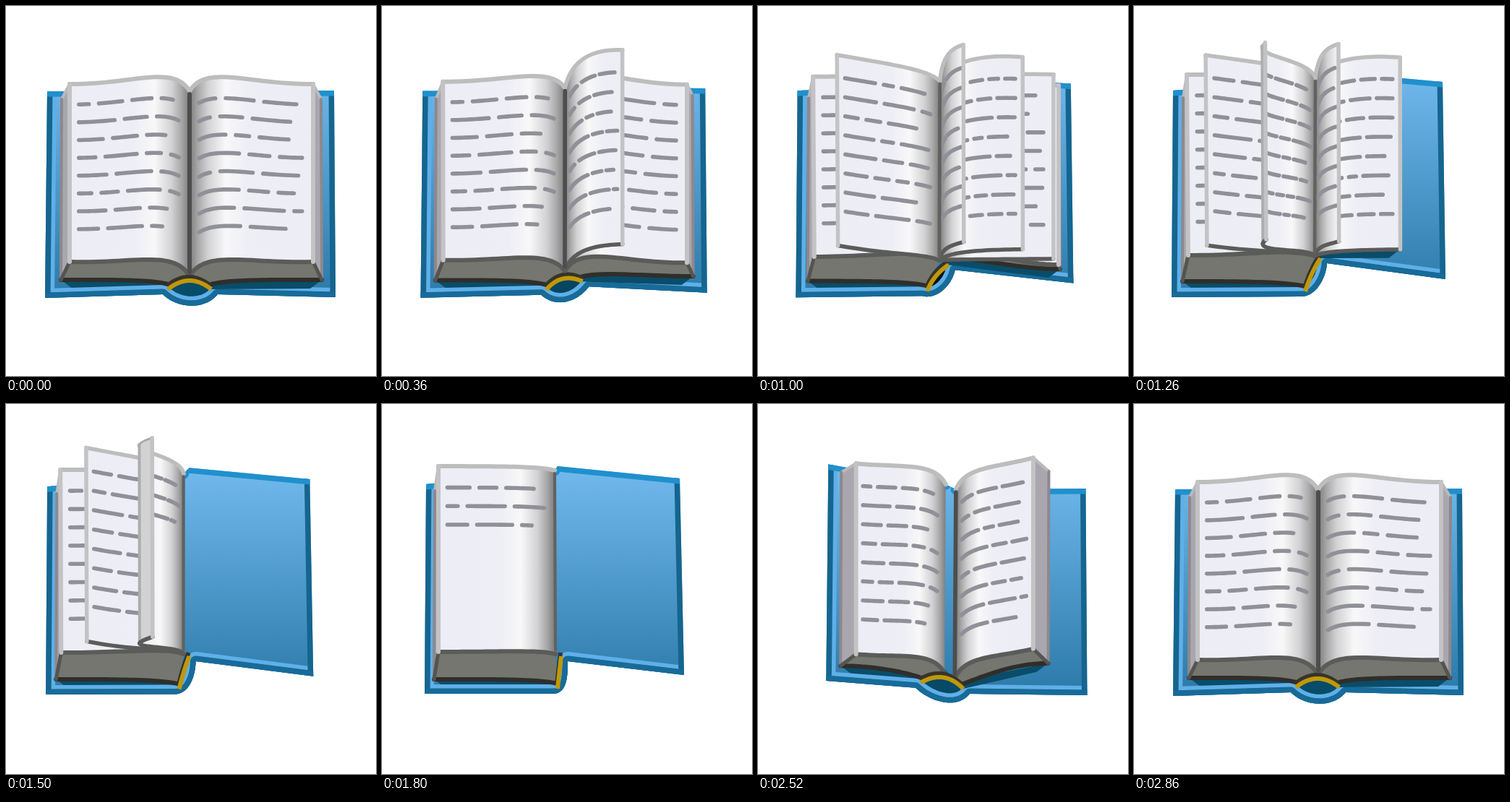
Animation of 512x512 px, one loop 3000 ms. Source, as an HTML page with a canvas:

```html
<!DOCTYPE html>
<html lang="en">
<head>
<meta charset="utf-8">
<title>Book</title>
<style>
html, body { margin: 0; width: 100%; height: 100%; overflow: hidden; background: #fff; }
canvas { display: block; width: 100vw; height: 100vh; }
</style>
</head>
<body>
<canvas id="stage" width="512" height="512"></canvas>
<script>
const ctx = document.getElementById('stage').getContext('2d');
const LOOP = 3000, STEP = 20;
const BEGIN = 60, REST = 1800, END = 2860;

// Key poses: cover corners, spine ends, left page block
const OPEN = {
  lt: [57, 118], lb: [54, 404], rt: [454, 117], rb: [456, 403], hinge: [255, 118],
  j0: [217, 399], j3: [293, 399], top: [254, 118], bottom: [254, 374],
  faceT: [88, 108], faceB: [88, 354], baseB: [76, 379], rise: 38,
};
const FANNED = {
  lt: [54, 117], lb: [52, 403], rt: [427, 105], rb: [431, 378], hinge: [262, 90],
  j0: [230, 402], j3: [267, 356], top: [251, 100], bottom: [250, 346],
  faceT: [73, 95], faceB: [75, 345], baseB: [67, 381], rise: 12,
};
const STACKED = {
  lt: [61, 111], lb: [59, 401], rt: [412, 103], rb: [418, 375], hinge: [243, 86],
  j0: [236, 401], j3: [257, 356], top: [239, 92], bottom: [240, 346],
  faceT: [78, 86], faceB: [78, 343], baseB: [72, 381], rise: 6,
};
const LIFTED = {
  lt: [134, 52], lb: [131, 364], rt: [453, 117], rb: [455, 403], hinge: [291, 118],
  j0: [219, 387], j3: [293, 403], top: [265, 105], bottom: [262, 372],
  faceT: [179, 59], faceB: [179, 339], baseB: [149, 347], rise: 26,
};
const POSES = [[BEGIN, OPEN], [1260, FANNED], [REST, STACKED], [2200, LIFTED], [END, OPEN]];

// Sheets turned one by one
const STARTS = [60, 395, 640, 770, 900, 1035], TURN = 730;

const clamp = x => Math.min(1, Math.max(0, x));
const smooth = x => (1 - Math.cos(Math.PI * x)) / 2;
const shift = (p, dx, dy) => [p[0] + dx, p[1] + dy];
const mix = (a, b, k) => [a[0] + (b[0] - a[0]) * k, a[1] + (b[1] - a[1]) * k];
const blend = (a, b, k) => Object.fromEntries(Object.keys(a).map(name => [name,
  Array.isArray(a[name]) ? mix(a[name], b[name], k) : a[name] + (b[name] - a[name]) * k]));
const mirror = p => [513 - p[0], p[1]];
const baseTop = b => shift(b.baseB, 1, b.faceT[1] - b.faceB[1] - 4);

function bodyAt(t) {
  let i = 0;
  while (i < POSES.length - 2 && t > POSES[i + 1][0]) i++;
  const [[t0, from], [t1, to]] = [POSES[i], POSES[i + 1]];
  const k = clamp((t - t0) / (t1 - t0));
  const p = blend(from, to, t > REST ? smooth(k) : k);
  p.baseT = baseTop(p);
  // The spine bows less as its two ends tilt
  p.y0 = shift(p.j0, 7, -7);
  p.y1 = shift(p.j3, -9, -7);
  const dx = p.y1[0] - p.y0[0], dy = p.y1[1] - p.y0[1], level = dx / Math.hypot(dx, dy);
  p.yc = shift(mix(p.y0, p.y1, 0.5), 0.4 * level ** 2 * dy, -0.4 * level ** 2 * dx);
  p.bow = level ** 3;
  p.j1 = shift(p.j0, 20, 20 * p.bow);
  p.j2 = shift(p.j3, -18 * p.bow, 22);
  return p;
}

// Right page block: thins down to its last sheet
function rightAt(t) {
  const full = { faceT: mirror(OPEN.faceT), faceB: mirror(OPEN.faceB), baseB: mirror(OPEN.baseB) };
  const thin = { faceT: [416, 110], faceB: [416, 358], baseB: [418, 364] };
  const b = blend(full, thin, clamp((t - BEGIN) / 900));
  b.baseT = shift(baseTop(b), -2, 0);
  return b;
}

// A leaf swung about the spine: angle 0 lies right, PI lies left
function swing(right, left, angle) {
  const k = (1 - Math.cos(angle)) / 2, lift = Math.sin(angle);
  return {
    tip: shift(mix(right.tip, left.tip, k), 0, -53 * lift),
    foot: shift(mix(right.foot, left.foot, k), 0, -28 * lift),
  };
}
const face = b => ({ tip: b.faceT, foot: b.faceB });
const base = b => ({ tip: b.baseT || baseTop(b), foot: b.baseB });

// Text rows as dash lengths
let seed = 11;
const random = () => (seed = seed * 16807 % 2147483647) / 2147483647;
function makeRows(count = 8) {
  return Array.from({ length: count }, () => {
    const row = [];
    for (let room = 140; room > 10; room -= row[row.length - 1] + 14)
      row.push(Math.min(room, 14 + 42 * random()));
    return row;
  });
}
const LEFT_TEXT = makeRows(), RIGHT_TEXT = makeRows(), LAST_TEXT = makeRows(3);
const fronts = STARTS.map((s, i) => i ? makeRows() : RIGHT_TEXT);
const backs = STARTS.map((s, i) => i < STARTS.length - 1 ? makeRows() : LAST_TEXT);

// Drawing helpers
function curve(a, b, c, d, n = 28) {
  return Array.from({ length: n + 1 }, (_, i) => {
    const s = i / n, ab = mix(a, b, s), bc = mix(b, c, s), cd = mix(c, d, s);
    return mix(mix(ab, bc, s), mix(bc, cd, s), s);
  });
}
function trace(points, closed) {
  ctx.beginPath();
  points.forEach(p => ctx.lineTo(p[0], p[1]));
  if (closed) ctx.closePath();
}
function fill(points, style) { trace(points, true); ctx.fillStyle = style; ctx.fill(); }
function stroke(points, style, width) {
  trace(points);
  ctx.strokeStyle = style;
  ctx.lineWidth = width;
  ctx.stroke();
}

// Points along a curve, spaced by horizontal travel
function walker(points) {
  const sums = [0];
  for (let i = 1; i < points.length; i++)
    sums.push(sums[i - 1] + Math.abs(points[i][0] - points[i - 1][0]));
  const total = sums[sums.length - 1] || 1;
  return u => {
    let i = 1;
    while (i < points.length - 1 && sums[i] < u * total) i++;
    return mix(points[i - 1], points[i], (u * total - sums[i - 1]) / (sums[i] - sums[i - 1] || 1));
  };
}

function drawText(top, bottom, rows) {
  const upper = walker(top), lower = walker(bottom), width = 168, margin = 13;
  const onLeft = top[top.length - 1][0] < top[0][0];
  rows.forEach((row, i) => {
    let x = margin;
    for (const length of row) {
      const dash = Array.from({ length: 9 }, (_, k) => {
        const along = (x + length * k / 8) / width, u = onLeft ? 1 - along : along;
        return mix(upper(u), lower(u), 0.115 + 0.1 * i);
      });
      stroke(dash, '#909098', 5.6);
      x += length + 14;
    }
  });
}

function paper(from, to) {
  const reach = Math.max(110, Math.abs(to - from));
  const g = ctx.createLinearGradient(from, 0, from + (to < from ? -reach : reach), 0);
  [[0, '#7c7c7c'], [0.07, '#a9a9a9'], [0.15, '#d2d2d4'], [0.29, '#f8f8f9'], [0.46, '#eeeef5'], [1, '#ededf6']]
    .forEach(stop => g.addColorStop(...stop));
  return g;
}

function drawFace(top, bottom, rows, edge) {
  const last = top.length - 1;
  // A rolled-over rim starts where the sheet turns back
  let fold = last;
  if (top[last][0] < top[0][0])
    top.forEach((p, i) => { if (p[0] < top[fold][0]) fold = i; });
  const a = top.slice(0, fold + 1), b = bottom.slice(0, fold + 1);
  fill([...a, ...b.slice().reverse()], paper(a[0][0], a[fold][0]));
  drawText(a, b, rows);
  stroke(bottom, '#5b5b59', edge);
  stroke(a, '#bdbdbe', edge);
  if (fold < last) {
    const rim = top.slice(fold), foot = bottom.slice(fold);
    fill([...rim, ...foot.slice().reverse()], '#d2d2d3');
    stroke(rim, '#aaaaab', 3);
    stroke([top[fold], bottom[fold]], '#adadae', 4);
    stroke(foot, '#5b5b59', edge);
  }
  stroke([top[last], bottom[last]], '#c3c3c5', edge);
}

function blockCurve(spine, corner, rise) {
  const w = corner[0] - spine[0], dy = spine[1] - corner[1];
  return curve(spine, [spine[0] + 0.13 * w, spine[1] - rise],
    [spine[0] + 0.475 * w, corner[1] + dy * Math.abs(dy) / 130], corner);
}

function drawBlock(b, rise, end, rows) {
  const top = blockCurve(b.top, b.faceT, rise), bottom = blockCurve(b.bottom, b.faceB, rise);
  const w = end[0] - b.baseB[0];
  const under = curve(b.baseB, shift(b.baseB, 0.43 * w, 0),
    [b.baseB[0] + 0.83 * w, end[1] - 14], shift(end, 0, -7));
  fill([...bottom, ...under], '#75766f');
  stroke(under, '#2f2e2a', 6);
  fill([b.faceT, b.faceB, b.baseB, b.baseT], '#a9a6ae');
  stroke([b.faceT, b.baseT], '#bab9bc', 4);
  stroke([b.baseT, b.baseB], '#8d888d', 4);
  stroke([b.baseB, b.faceB], '#55554f', 5);
  drawFace(top, bottom, rows, 6);
}

function drawShadow(end, corner) {
  const inward = Math.sign(end[0] - corner[0]);
  fill([end, shift(end, 0, -12), corner, shift(corner, 16 * inward, 12)], '#0a4c69');
}

function drawCover(p) {
  const spine = curve(p.j0, p.j1, p.j2, p.j3);
  const rim = [p.lt, p.lb, ...spine, p.rb];
  ctx.save();
  trace([...rim, p.rt, p.hinge, p.top], true);
  ctx.clip();
  const g = ctx.createLinearGradient(0, 95, 0, 400);
  g.addColorStop(0, '#70b8ec');
  g.addColorStop(1, '#2c7aa9');
  ctx.fillStyle = g;
  ctx.fillRect(0, 0, 512, 512);
  fill([...spine, p.y1, p.yc, p.y0], `hsl(198 87% ${22 * p.bow}%)`);
  drawShadow(p.y0, p.baseB);
  stroke(rim, '#5fafe8', 26);
  stroke([...rim, p.rt], '#15658f', 15);
  stroke([p.lb, ...spine, p.rb], '#186b99', 14);
  stroke([p.lt, p.top], '#2090cc', 15);
  stroke([p.hinge, p.rt], '#2090cc', 15);
  ctx.restore();
}

function drawHeadband(p) {
  const band = curve(p.y0, mix(p.y0, p.yc, 2 / 3), mix(p.y1, p.yc, 2 / 3), p.y1);
  ctx.lineCap = 'butt';
  stroke(band.map(q => shift(q, -1, -5)), '#38342a', 6);
  stroke(band, '#c09808', 6);
  ctx.lineCap = 'round';
}

const angleAt = (i, t) => Math.PI * clamp((t - STARTS[i]) / TURN) ** 1.2;

function drawSheet(i, p, leaf, angle) {
  const { tip, foot } = leaf, cos = Math.cos(angle), sin = Math.sin(angle);
  const bend = 0.65 + 0.25 * cos, sag = sin * sin * (12 - 30 * cos);
  const curl = 78 * Math.exp(-(((angle - 1.83) / 0.22) ** 2));
  const side = (spine, corner, dip) => {
    const w = corner[0] - spine[0];
    return curve(spine, [spine[0] + 0.11 * w, spine[1] + (corner[1] - spine[1]) * bend],
      [spine[0] + 0.5 * w - curl, corner[1] + dip], corner);
  };
  const rows = tip[0] > p.top[0] ? fronts[i] : backs[i];
  drawFace(side(p.top, tip, sag), side(p.bottom, foot, Math.max(sag, 1)), rows, 5.5);
}

// The stack swings back to the right half as one chunk
function drawChunk(t, p) {
  const right = { faceT: mirror(OPEN.faceT), faceB: mirror(OPEN.faceB), baseB: mirror(OPEN.baseB) };
  const angle = Math.PI * (1 - clamp((t - REST) / (END - REST))) ** 1.4;
  const outer = swing(base(right), face(STACKED), angle);
  const inner = swing(face(right), base(STACKED), angle + 0.14 * Math.sin(angle));
  const flipped = outer.tip[0] + inner.tip[0] > 2 * p.hinge[0];
  const [front, rear] = flipped ? [inner, outer] : [outer, inner];
  const top = p.hinge, bottom = shift(p.bottom, top[0] - p.top[0], top[1] - p.top[1]);
  if (flipped) drawShadow(p.y1, rear.foot);
  drawBlock({ top, bottom, faceT: front.tip, faceB: front.foot, baseT: rear.tip, baseB: rear.foot },
    p.rise, p.y1, flipped ? RIGHT_TEXT : LAST_TEXT);
  return [top, bottom];
}

function draw(t) {
  const p = bodyAt(t), right = rightAt(t), returning = t > REST;
  const landed = STARTS.filter(s => t >= s + TURN).length;
  const started = STARTS.filter(s => t > s).length;
  const sheets = STARTS.map((s, i) => {
    const angle = angleAt(i, t);
    return { i, angle, ...swing(face(right), face(p), angle) };
  }).slice(landed, started);
  const onRight = sheets.filter(s => s.tip[0] > p.top[0]).reverse();
  const onLeft = sheets.filter(s => s.tip[0] <= p.top[0]);

  ctx.clearRect(0, 0, 512, 512);
  ctx.lineJoin = ctx.lineCap = 'round';
  drawCover(p);
  if (started < STARTS.length) {
    drawShadow(p.y1, right.baseB);
    drawBlock({ ...right, top: p.top, bottom: p.bottom }, 38, p.y1, fronts[started]);
  } else if (onRight.length) {
    drawShadow(p.y1, onRight[0].foot);
  }
  drawBlock(p, p.rise, p.y0, landed && !returning ? backs[landed - 1] : LEFT_TEXT);
  const [seamTop, seamBottom] = returning ? drawChunk(t, p) : [p.top, p.bottom];
  drawHeadband(p);
  [...onRight, ...onLeft].forEach(s => drawSheet(s.i, p, s, s.angle));

  const weight = 4 + 2 * clamp((p.rise - 6) / 32);
  stroke([shift(seamTop, 0, 4), shift(seamBottom, 0, -6)], weight > 5.5 ? '#4d4d4d' : '#62615f', weight);
}

const begin = performance.now();
function frame() {
  const t = (performance.now() - begin) % LOOP;
  draw(Math.floor(t / STEP) * STEP);
  requestAnimationFrame(frame);
}
frame();
</script>
</body>
</html>
```
